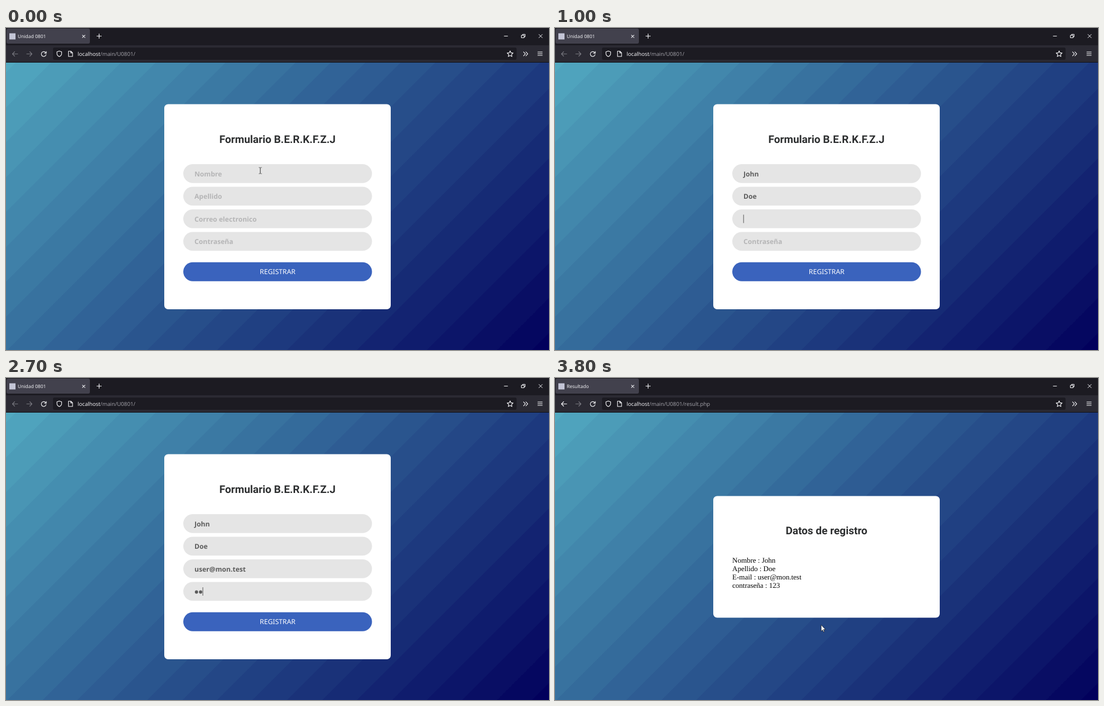
Animation of 971x577 px, one loop 5000 ms. Source, as an HTML page:

```html
<!DOCTYPE html>
<html lang="es">
<head>
<meta charset="utf-8">
<title>Formulario</title>
<style>
  html, body { margin: 0; width: 100%; height: 100%; overflow: hidden; background: #1c1b22; }
  svg { display: block; text-rendering: geometricPrecision; }
  .ui { font-family: "Open Sans", "Noto Sans", sans-serif; fill: #fbfbfe; }
  .tab { font-size: 8.5px; }
  .url { font-size: 9.7px; }
  .dim { fill: #a5a4ab; }
  .icon { fill: none; stroke: #fbfbfe; stroke-width: 1.1; stroke-linecap: round; stroke-linejoin: round; }
  .off { opacity: .38; }
  .title { font: 700 19px Roboto, sans-serif; fill: #2d2f30; text-anchor: middle; }
  .field { font: 700 12.1px "Noto Sans", "Open Sans", sans-serif; fill: #5c5c5c; }
  .hint { fill: #b5b5b6; }
  .button { font: 12.2px "Noto Sans", "Open Sans", sans-serif; fill: #fff; text-anchor: middle; }
  .data { font: 13px "Liberation Serif", serif; fill: #000; }
</style>
</head>
<body>
<svg width="971" height="577" viewBox="0 0 971 577">
  <defs>
    <linearGradient id="sky" gradientUnits="userSpaceOnUse" x1="0" y1="62" x2="743" y2="805"></linearGradient>
    <linearGradient id="fade" gradientUnits="userSpaceOnUse" x1="112" y1="0" x2="132" y2="0">
      <stop stop-color="#fbfbfe"/><stop offset="1" stop-color="#fbfbfe" stop-opacity=".1"/>
    </linearGradient>
    <filter id="near" filterUnits="userSpaceOnUse" x="250" y="190" width="471" height="270"><feGaussianBlur stdDeviation="6"/></filter>
    <filter id="far" filterUnits="userSpaceOnUse" x="250" y="190" width="471" height="270"><feGaussianBlur stdDeviation="11"/></filter>
    <clipPath id="tabBox"><rect x="1" y="1" width="149" height="27" rx="3"/></clipPath>
    <clipPath id="tabText"><rect x="20" y="1" width="112" height="27"/></clipPath>
  </defs>

  <rect y="62" width="971" height="515" fill="url(#sky)"/>

  <!-- browser chrome -->
  <rect width="971" height="31" fill="#1c1b22"/>
  <rect y="31" width="971" height="30" fill="#2b2a33"/>
  <rect y="61" width="971" height="1" fill="#0f0f14"/>
  <rect x="84" y="35" width="829" height="22" rx="3" fill="#1c1b22"/>
  <g clip-path="url(#tabBox)">
    <rect x="1" y="1" width="149" height="27" fill="#42414d"/>
    <rect id="burst" x="1" y="1" height="27" fill="#33598b"/>
  </g>
  <rect id="badge" x="6" y="9.5" width="11" height="11" fill="#c3c5d6"/>
  <circle id="loading" cx="13" cy="15" r="1.5" fill="#d8d8de"/>
  <g clip-path="url(#tabText)"><text id="tab" class="ui tab" x="21" y="18"></text></g>
  <text class="ui url" x="128" y="50">localhost<tspan id="path" class="dim"></tspan></text>
  <g class="icon">
    <path d="M136.8 12.8l4.4 4.4m0-4.4l-4.4 4.4M162.5 14.5h8m-4-4v8"/>
    <path d="M891 14.5h6M953 11.5l6 6m0-6l-6 6M922 13h4.5v4.5H922zM923.8 13v-1.700h4.500v4.500h-1.800" stroke-width="1"/>
    <path id="back" d="M21 46.500H11.500M15.500 42.500l-4 4 4 4"/>
    <path class="off" d="M37 46.500h9.500M42.500 42.500l4 4-4 4"/>
    <path id="reload" d="M71.200 44.500A4.300 4.300 0 1 0 71.700 47.500M72 42v3.300h-3.300"/>
    <path id="stop" d="M64.500 43.500l5 5.500"/>
    <path d="M95.300 41.200l4.200 1.600v2.700c0 2.800-1.800 4.800-4.200 5.800-2.400-1-4.200-3-4.200-5.800v-2.700z"/>
    <path d="M111.800 41.500h4.200l3 3v6.500h-7.200zM115.800 41.700v3h3"/>
    <path id="star"/>
    <path d="M925.500 42.800l3.300 3.500-3.300 3.500M929.700 42.800l3.300 3.500-3.300 3.500M951 43h8M951 46h8M951 49h8"/>
  </g>

  <!-- form page -->
  <g id="form">
    <rect x="283" y="136.500" width="405" height="367.500" rx="7" fill="#fff"/>
    <text class="title" x="485.500" y="205.500">Formulario B.E.R.K.F.Z.J</text>
    <g id="fields"></g>
    <rect id="button" x="317" y="419.700" width="337.500" height="34" rx="17"/>
    <text class="button" x="485.700" y="441.200">REGISTRAR</text>
  </g>

  <!-- result page -->
  <g id="result">
    <rect x="283" y="211.500" width="405" height="218" rx="7" fill="#fff"/>
    <text class="title" x="485.500" y="280.300">Datos de registro</text>
    <g id="data" class="data"></g>
  </g>

  <g id="status">
    <path d="M0 565h190q2 0 2 2v10H0z" fill="#2f2e35"/>
    <text class="ui" x="2" y="575.500" font-size="8.400">localhost</text>
  </g>

  <path id="beam" d="M452 250h2q.7 0 .7 1v9q0 1-.7 1h-2M457.500 250h-2q-.8 0-.8 1v9q0 1 .8 1h2" fill="none" stroke="#444" stroke-width=".8"/>
  <path id="hand" d="M475 444.500q1.300-1.600 2.500 0v5l1.600.2 1.500.5 1.400.6q1 .5.800 2l-.6 2.500-.9 2.700h-5l-2.400-3.400-1.500-2.500q.6-1.500 1.800-.6l.8.900z" fill="#fff" stroke="#111" stroke-width=".8"/>
  <path id="arrow" d="M476 442.500v11.200l2.500-2.300 1.700 3.700 1.700-.8-1.700-3.600h3.500z" fill="#fff" stroke="#111" stroke-width=".7"/>
</svg>

<script>
const LOOP = 5000, STEP = 100;
const SENT = 2900, LOAD = 3000, DONE = 3100, READY = 3500;
const $ = id => document.getElementById(id);
const show = (el, on) => { el.style.display = on ? '' : 'none'; };

function add(parent, tag, attrs, text = '') {
  const el = document.createElementNS('http://www.w3.org/2000/svg', tag);
  for (const key in attrs) el.setAttribute(key, attrs[key]);
  el.textContent = text;
  return parent.appendChild(el);
}

// Diagonal gradient made of flat bands
const from = [82, 169, 192], to = [2, 0, 92], span = 1486, band = 62.5;
for (let d = 18 - band; d < span; d += band) {
  const mid = Math.min(1, Math.max(0, (d + band / 2) / span));
  const color = `rgb(${from.map((c, i) => Math.round(c + (to[i] - c) * mid))})`;
  for (const edge of [d, d + band])
    add($('sky'), 'stop', { offset: Math.min(1, Math.max(0, edge / span)), 'stop-color': color });
}

const points = Array.from({ length: 10 }, (_, i) => {
  const r = i % 2 ? 2.7 : 5.6, a = i * Math.PI / 5;
  return `${901.5 + r * Math.sin(a)} ${46.6 - r * Math.cos(a)}`;
});
$('star').setAttribute('d', `M${points.join('L')}Z`);

// keys: [time, characters typed so far]
const fields = [
  { hint: 'Nombre', label: 'Nombre', value: 'John', focus: 100, blur: 700,
    keys: [[400, 1], [500, 3], [600, 4]] },
  { hint: 'Apellido', label: 'Apellido', value: 'Doe', focus: 700, blur: 1000,
    keys: [[800, 1], [900, 3]] },
  { hint: 'Correo electronico', label: 'E-mail', value: 'user@mon.test', focus: 1000, blur: 2200,
    keys: [[1300, 1], [1400, 2], [1500, 3], [1600, 4], [1800, 5], [1900, 7], [2000, 10], [2100, 13]] },
  { hint: 'Contraseña', label: 'contraseña', value: '123', secret: true, focus: 2200, blur: SENT,
    keys: [[2500, 1], [2700, 2], [2800, 3]] }
];
const glows = [
  null,
  { grow: 5, filter: 'near', opacity: .8 },
  { grow: 10, filter: 'far', opacity: .3 }
];

const pill = (y, grow = 0) => ({
  x: 317 - grow, y: y - grow, width: 337.5 + 2 * grow, height: 33.7 + 2 * grow, rx: 17 + grow
});

fields.forEach((f, i) => {
  const y = 244 + 40.5 * i, box = $('fields');
  f.glows = glows.map(g => g && add(box, 'rect', {
    ...pill(y, g.grow), fill: '#3a5fc4', opacity: g.opacity, filter: `url(#${g.filter})`
  }));
  add(box, 'rect', { ...pill(y), fill: '#e5e5e5' });
  f.hintText = add(box, 'text', { class: 'field hint', x: 337, y: y + 21.6 }, f.hint);
  f.text = add(box, 'text', { class: 'field', x: 337, y: y + 21.6 });
  f.dots = f.secret ? [0, 1, 2].map(n =>
    add(box, 'circle', { cx: 340.6 + 7.4 * n, cy: y + 18, r: 2.9, fill: '#5c5c5c' })) : [];
  f.caret = add(box, 'rect', { y: y + 9.5, width: 1, height: 15, fill: '#555' });
  add($('data'), 'text', { x: 317, y: 331.3 + 14.9 * i }, `${f.label} : ${f.value}`);
});

function drawField(f, t) {
  const focused = t >= f.focus && t < f.blur;
  const count = f.keys.reduce((n, [at, chars]) => t >= at ? chars : n, 0);
  const stage = focused ? (t - f.focus) / STEP : 0;
  f.glows.forEach((g, i) => g && show(g, i === stage));
  show(f.hintText, !focused && !count);
  f.text.textContent = f.secret ? '' : f.value.slice(0, count);
  f.dots.forEach((dot, i) => show(dot, i < count));
  show(f.caret, focused);
  if (focused) {
    const width = f.secret ? 7.4 * count : count && f.text.getComputedTextLength();
    f.caret.setAttribute('x', 336.7 + width);
  }
}

function draw(time) {
  const t = Math.floor(time % LOOP / STEP) * STEP;
  const sent = t >= LOAD, done = t >= DONE, loading = sent && !done;
  const hover = t >= SENT && !done;

  show($('form'), !done);
  show($('result'), done);
  if (!done) fields.forEach(f => drawField(f, t));
  $('button').setAttribute('fill', hover ? '#053f82' : '#3a63bd');

  $('tab').textContent = done ? 'Resultado' : sent ? 'localhost/main/U0801/result.php' : 'Unidad 0801';
  $('tab').style.fill = loading ? 'url(#fade)' : '';
  $('path').textContent = '/main/U0801/' + (sent ? 'result.php' : '');
  $('back').classList.toggle('off', !sent);
  $('reload').classList.toggle('off', done && t < READY);
  show($('reload'), !loading);
  show($('stop'), loading);
  show($('loading'), loading);
  show($('status'), loading);
  show($('badge'), !sent || t > DONE);

  const sweep = (t - DONE) / (READY - DONE);
  show($('burst'), sweep >= 0 && sweep < 1);
  $('burst').setAttribute('width', Math.min(149, 50 + 240 * Math.max(0, sweep)));
  $('burst').setAttribute('opacity', Math.min(1, Math.max(0, 1 - sweep)));

  show($('beam'), t < 400);
  show($('hand'), hover);
  show($('arrow'), done);
}

const start = performance.now();
function tick() {
  draw(performance.now() - start);
  requestAnimationFrame(tick);
}
tick();
</script>
</body>
</html>
```
